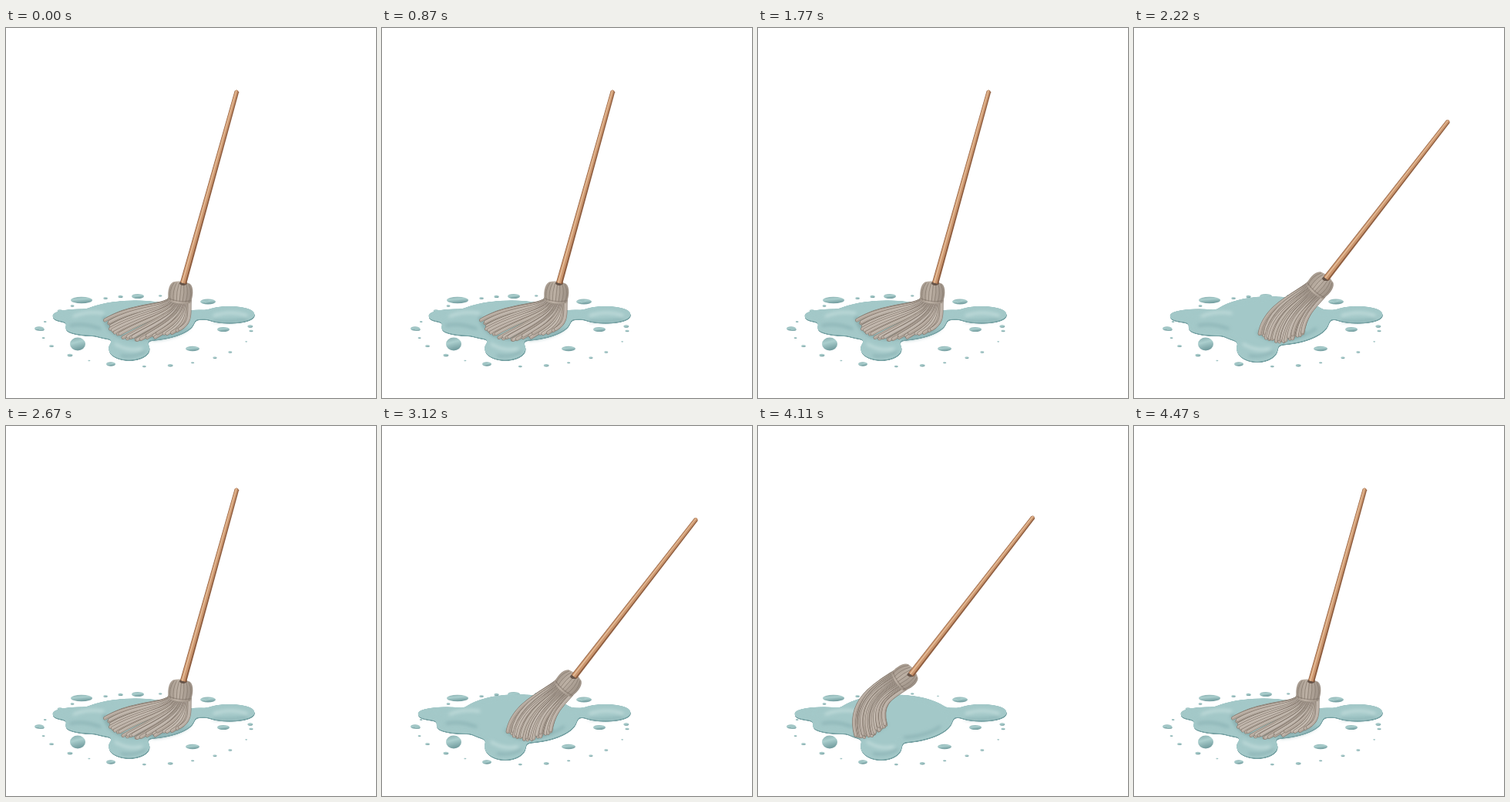
Write an HTML page that moves like this. It is 480x480 px and loops after 4.5 s.

```html
<!DOCTYPE html>
<html lang="en">
<head>
<meta charset="utf-8">
<title>Mop</title>
<style>
html, body { margin: 0; width: 100%; height: 100%; overflow: hidden; background: #fff; }
svg { display: block; width: 100%; height: 100%; }
</style>
</head>
<body>
<svg viewBox="0 0 480 480" fill="none" stroke-linecap="round" stroke-linejoin="round">
  <defs>
    <linearGradient id="drop" x1="0" y1="0" x2=".3" y2="1">
      <stop offset="0" stop-color="#86adae"/>
      <stop offset=".45" stop-color="#abcfce"/>
      <stop offset="1" stop-color="#759fa1"/>
    </linearGradient>
    <linearGradient id="knot" x1="0" y1="0" x2="1" y2="0">
      <stop offset="0" stop-color="#a4988c"/>
      <stop offset=".4" stop-color="#bdb1a5"/>
      <stop offset="1" stop-color="#9b8f84"/>
    </linearGradient>
    <filter id="soft" x="-20%" y="-50%" width="140%" height="200%"><feGaussianBlur stdDeviation="2"/></filter>
    <filter id="merge" color-interpolation-filters="sRGB">
      <feGaussianBlur stdDeviation="3"/>
      <feColorMatrix values="1 0 0 0 0  0 1 0 0 0  0 0 1 0 0  0 0 0 16 -7"/>
    </filter>
  </defs>
  <g id="drops"></g>
  <path class="pool" fill="#74a0a2" filter="url(#merge)"/>
  <path class="pool" fill="#a3c8c8" filter="url(#merge)" transform="translate(-.4 -1.5)"/>
  <g filter="url(#soft)" stroke-width="3">
    <path stroke="#c6dfde" d="M88 374Q104 367 126 370M142 410Q158 420 176 416M270 373Q292 366 312 373"/>
    <path stroke="#7fa9ab" opacity=".7" d="M84 386Q100 382 122 390M150 425Q166 428 180 420M270 380Q290 382 312 378M190 404Q220 402 236 390"/>
    <path id="shade" stroke="#5d8386" stroke-width="5" opacity=".4"/>
  </g>
  <g id="strands"></g>
  <g id="collar">
    <path fill="url(#knot)" d="M-14 4C-17 -4 -17 -17 -11 -21Q0 -25 11 -21C17 -17 17 -4 14 4Q0 8 -14 4Z"/>
    <path id="folds" stroke="#85796e" stroke-width=".9" opacity=".8"/>
    <path stroke="#786c61" stroke-width="1.2" opacity=".5" d="M-14 1Q0 5 14 1"/>
  </g>
  <ellipse id="socket" rx="5" ry="3" fill="#665449"/>
  <path id="bark" fill="#8f5e40"/>
  <path id="wood" fill="#cb966e"/>
  <path id="shine" fill="#e6bd98"/>
<script>
</script>
</svg>
<script>
const NS = "http://www.w3.org/2000/svg";
const $ = id => document.getElementById(id);
const LOOP = 900, STEP = 30, STICK = 258, COUNT = 30;

function add(parent, tag, attrs) {
  const el = document.createElementNS(NS, tag);
  for (const k in attrs) el.setAttribute(k, attrs[k]);
  return parent.appendChild(el);
}

let seed = 11;
const rand = () => (seed = (seed * 16807) % 2147483647) / 2147483647;
const mix = (a, b, k) => a + (b - a) * k;
const mixPt = (p, q, k) => [mix(p[0], q[0], k), mix(p[1], q[1], k)];
const move = (p, v, k) => [p[0] + v[0] * k, p[1] + v[1] * k];
const heading = deg => [Math.cos(deg * Math.PI / 180), Math.sin(deg * Math.PI / 180)];
const fmt = p => p[0].toFixed(2) + " " + p[1].toFixed(2);

// Pose: stick foot and lean, neck and turn, fringe curve, strand pull, puddle spread
const rest = [230,331,15.6, 225.5,351.5,6, 128,376,140,420,226,391, .42,-.24, 0];
const reach = [292,328,35.4, 282,349,25, 190,388,215,425,268,402, .3,-.3, 1];
const flick = [198.5,322.5,37.8, 184,330,55, 126,401,146,404,165,387, -.15,-.54, 1];
const keys = [[0, rest], [330, reach], [510, flick], [690, rest], [LOOP, rest]];

// Hermite blend: only the flick is passed at speed
function poseAt(t) {
  const i = keys.findIndex((key, n) => t < keys[n + 1][0]);
  const [ta, a] = keys[i], [tb, b] = keys[i + 1];
  const span = tb - ta, k = (t - ta) / span;
  const ease = k * k * (3 - 2 * k);
  return a.map((v, n) => {
    const speed = (rest[n] - reach[n]) / 360 * span;
    const leave = a === flick ? speed * k * (1 - k) ** 2 : 0;
    const arrive = b === flick ? speed * k * k * (k - 1) : 0;
    return mix(v, b[n], ease) + leave + arrive;
  });
}

const oval = (x, y, rx, ry) =>
  `M${x - rx} ${y}a${rx} ${ry} 0 1 1 ${2 * rx} 0a${rx} ${ry} 0 1 1 ${-2 * rx} 0Z`;

// Puddle lobes: x, y, rx, ry, drift and swell when spread
const lobes = [
  [168,381,77,26,8,5], [98,375,39,9,-13,0], [114,390,38,10,-6,0],
  [252,373,24,6,0,0], [290,373,34,10.5,0,0], [160,417,27,15,0,2]
];
const poolPath = w => lobes.map(([x, y, rx, ry, drift, swell]) =>
  oval(x + drift * w, y, rx, ry + swell * w)).join("");

function addDrop(x, y, rx, ry) {
  add($("drops"), "ellipse", { cx: x, cy: y, rx, ry, fill: "url(#drop)" });
}
// Large drops by place, the small ones scattered on a ring
const large = [[98,353,14], [171,348,8], [262,355,10], [282,391,8], [242,416,9], [136,436,6], [43,390,6]];
for (const [x, y, r] of large) addDrop(x, y, r, 1.5 + r * .2);
addDrop(93, 410, 10, 8.5);
for (let i = 0; i < 24; i++) {
  const [c, s] = heading(i * 15 + rand() * 8), r = 1.3 + rand() * 3;
  addDrop(182 + c * 136, 393 + s * 46, r, r * .5);
}

let folds = "";
for (let x = -12; x <= 12; x += 4) folds += `M${x * .8} -20Q${x * 1.35} -9 ${x} 3`;
$("folds").setAttribute("d", folds);

const strands = Array.from({ length: COUNT }, (_, i) => ({
  u: i / (COUNT - 1),
  jitter: [rand() * 6 - 2, rand() * 5 - 3],
  layers: [
    { stroke: "#81756a", "stroke-width": 4.8 },
    { stroke: `hsl(30 13% ${65 + rand() * 6}%)`, "stroke-width": 3.7 },
    { stroke: "#d3c9be", "stroke-width": 1, opacity: .6, transform: "translate(-.6 -.7)" }
  ].map(style => add($("strands"), "path", style))
}));

function drawStick(foot, lean) {
  const up = heading(lean - 90), side = heading(lean), tip = move(foot, up, STICK);
  // Taper to two thirds at the rounded tip
  const strip = (l, r) => `M${fmt(move(foot, side, r))}L${fmt(move(tip, side, r * .68))}` +
    `Q${fmt(move(tip, up, 4))} ${fmt(move(tip, side, l * .68))}L${fmt(move(foot, side, l))}Z`;
  $("bark").setAttribute("d", strip(-4.2, 4.2));
  $("wood").setAttribute("d", strip(-3.5, 2.2));
  $("shine").setAttribute("d", strip(-2.2, -.5));
  $("socket").setAttribute("transform", `translate(${fmt(foot)})`);
}

function drawStrand({ u, jitter, layers }, neck, turn, fringe, pull) {
  const root = move(neck, heading(turn), mix(-13, 13, u));
  const [e0, em, e1] = fringe;
  const end = move(mixPt(mixPt(e0, em, u), mixPt(em, e1, u), u), jitter, 1);
  const reachLen = Math.hypot(end[0] - root[0], end[1] - root[1]);
  const c = move(root, heading(turn + 90), reachLen * mix(.13, .35, u));
  const d = move(end, pull, reachLen);
  const path = `M${fmt(root)}C${fmt(c)} ${fmt(d)} ${fmt(end)}`;
  layers.forEach(el => el.setAttribute("d", path));
}

const pools = document.querySelectorAll(".pool");

function draw(ms) {
  const p = poseAt(Math.floor(ms / STEP) * STEP % LOOP);
  const neck = [p[3], p[4]], turn = p[5];
  const fringe = [[p[6], p[7]], [p[8], p[9]], [p[10], p[11]]];

  const pool = poolPath(p[14]);
  pools.forEach(el => el.setAttribute("d", pool));
  const [e0, em, e1] = fringe.map(fmt);
  $("shade").setAttribute("d", `M${e0}Q${em} ${e1}`);
  strands.forEach(s => drawStrand(s, neck, turn, fringe, [p[12], p[13]]));
  $("collar").setAttribute("transform", `translate(${fmt(neck)}) rotate(${turn})`);
  drawStick([p[0], p[1]], p[2]);
}

let start;
function tick(now) {
  start ??= now;
  draw(Math.max(0, now - start));
  requestAnimationFrame(tick);
}
draw(0);
requestAnimationFrame(tick);
</script>
</body>
</html>
```
